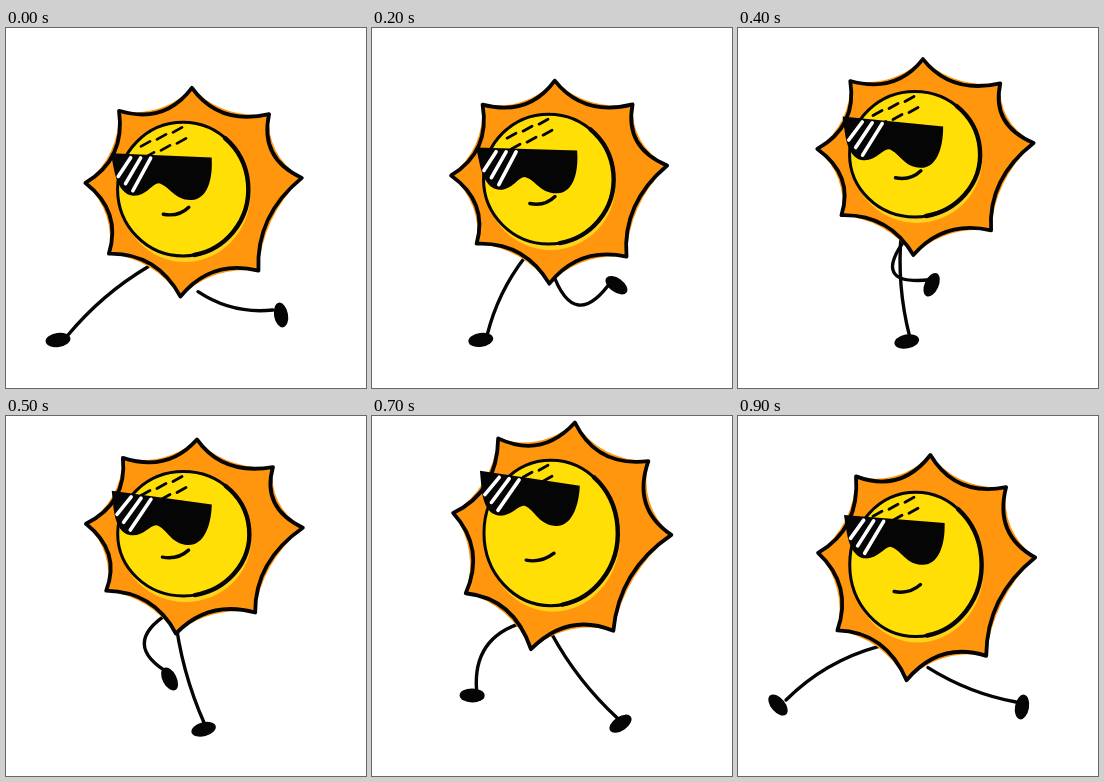
Animation, 360 px wide and 360 px high, one loop 1000 ms. Source, as an HTML page with a canvas:

```html
<!DOCTYPE html>
<html lang="en">
<head>
<meta charset="utf-8">
<title>Strolling sun</title>
<style>
html, body { margin: 0; width: 100%; height: 100%; overflow: hidden; background: #fff; }
canvas { display: block; width: 100vw; height: 100vh; }
</style>
</head>
<body>
<canvas id="stage" width="360" height="360"></canvas>
<script>
const ctx = document.getElementById('stage').getContext('2d');
const INK = '#050505', ORANGE = '#ff960e', YELLOW = '#ffdf06', GLOW = '#ffd21c';
const STEP = 100, STEPS = 10;

// Ray tips around the centre, clockwise from the top
const TIPS = [[-1, -100], [77, -77], [112, -17], [72, 73], [-5, 100], [-78, 61], [-104, -6], [-73, -76]];

const mix = (a, b, f) => a + (b - a) * f;
const rad = deg => deg * Math.PI / 180;

function bezier(t, a, b, c, d) {
  const u = 1 - t;
  return u * u * u * a + 3 * u * u * t * b + 3 * u * t * t * c + t * t * t * d;
}

// Periodic motion: mean plus the first and second harmonic
function wave(step, mean, cos1, sin1, cos2 = 0, sin2 = 0) {
  const a = step / STEPS * Math.PI * 2;
  return mean + cos1 * Math.cos(a) + sin1 * Math.sin(a) + cos2 * Math.cos(2 * a) + sin2 * Math.sin(2 * a);
}

function stroke(width, color = INK) {
  ctx.lineWidth = width;
  ctx.strokeStyle = color;
  ctx.stroke();
}

function fill(color) {
  ctx.fillStyle = color;
  ctx.fill();
}

function line(x1, y1, x2, y2, width, color) {
  ctx.beginPath();
  ctx.moveTo(x1, y1);
  ctx.lineTo(x2, y2);
  stroke(width, color);
}

function oval(x, y, rx, ry, angle = 0, from = 0, to = 360) {
  ctx.beginPath();
  ctx.ellipse(x, y, rx, ry, rad(angle), rad(from), rad(to));
}

// The knee sits off the middle of the line from hip to ankle
function drawLeg({ hip, foot, heel, bend, angle }) {
  const [hx, hy] = hip, [fx, fy] = foot;
  const ax = fx + heel, ay = fy - 5;
  const dx = ax - hx, dy = ay - hy, push = bend / Math.hypot(dx, dy);
  ctx.beginPath();
  ctx.moveTo(hx, hy);
  ctx.quadraticCurveTo((hx + ax) / 2 - dy * push, (hy + ay) / 2 + dx * push, ax, ay);
  stroke(3.4);
  oval(fx, fy, 12.5, 7, angle);
  fill(INK);
}

const plantedLeg = (t, bottom) => ({
  hip: [mix(142, 190, t), bottom - mix(30, 13, t)],
  foot: [bezier(t, 52, 131, 246, 284), bezier(t, 312, 308, 327, 291)],
  heel: mix(10, -6, t),
  bend: 9,
  angle: -8 - 72 * t ** 4
});

const swingingLeg = (t, bottom) => ({
  hip: [mix(192, 140, t), bottom - mix(5, 34, t)],
  foot: [bezier(t, 275, 249, 123, 40), bezier(t, 287, 213, 287, 289)],
  heel: mix(-8, 8, t),
  bend: 14 + 46 * Math.sin(Math.PI * t ** .6),
  angle: bezier(t, 80, 90, -320, -130)
});

function rayPath(tips, cx, cy, hollow) {
  ctx.beginPath();
  ctx.moveTo(...tips[0]);
  tips.forEach(([x, y], i) => {
    const [nx, ny] = tips[(i + 1) % tips.length];
    ctx.quadraticCurveTo(mix((x + nx) / 2, cx, hollow), mix((y + ny) / 2, cy, hollow), nx, ny);
  });
  ctx.closePath();
}

// The paint reaches a little past the ink line
function drawRays(lean, cy, height) {
  const cx = 183 + lean, stretch = height / 200;
  const tips = TIPS.map(([x, y]) => [cx + x - .21 * lean * y, cy + y * stretch + .167 * lean * x]);
  rayPath(tips, cx, cy, .2);
  fill(ORANGE);
  rayPath(tips, cx, cy, .27);
  stroke(3.8);
}

function drawFace(lean, top, height) {
  const x = 176.5 + 2.5 * lean, y = top + height * .485;
  const rx = 65 + 2 * lean, ry = height * .32;
  oval(x + 2, y + 5, rx, ry + 1);
  fill(GLOW);
  oval(x, y, rx, ry);
  fill(YELLOW);
  stroke(3);
  oval(x, y, rx, ry, 0, -50, 80);
  stroke(4.4);
  for (let i = 0; i < 6; i++) {
    const col = i % 3, row = Math.floor(i / 3);
    const hx = 135 + 16 * col + 4 * row, hy = y - ry + 24 - 7 * col + 11 * row;
    line(hx, hy, hx + 9, hy - 5, 2.8);
  }
  const sx = 158 - 4 * lean, sy = top + height * .605;
  ctx.beginPath();
  ctx.moveTo(sx, sy);
  ctx.quadraticCurveTo(sx + 15, sy + 3, sx + 25 + 3 * lean, sy - 7);
  stroke(3.4);
}

function drawGlasses(x, y, tilt) {
  ctx.save();
  ctx.translate(x, y);
  ctx.rotate(rad(tilt));
  ctx.beginPath();
  ctx.moveTo(0, -1);
  ctx.lineTo(101, 1);
  ctx.bezierCurveTo(103, 24, 97, 43, 82, 44);
  ctx.bezierCurveTo(65, 45, 60, 31, 49, 28);
  ctx.bezierCurveTo(42, 28, 37, 41, 24, 41);
  ctx.bezierCurveTo(13, 41, 7, 29, 4, 17);
  ctx.closePath();
  fill(INK);
  for (let i = 0; i < 3; i++) {
    line(20 + i * 10, 3, 8 + i * 7.5, 22 + i * 7, 3.6, '#fff');
  }
  ctx.restore();
}

function draw(step) {
  const cy = wave(step, 139.6, 21.8, 10.7, 2.9);
  const height = wave(step, 210.2, 7.2, -15.1, -8.6, -3.4);
  const lean = wave(step, .385, -.114, -.446, -.093, .056);
  const tilt = wave(step, 4, -2.7, -2.8);
  const brow = wave(step, 24.3, 5.9, 10.1, 1.7);
  const top = cy - height / 2, bottom = cy + height / 2;
  const t = step / (STEPS - 1);

  ctx.fillStyle = '#fff';
  ctx.fillRect(0, 0, 360, 360);
  drawLeg(swingingLeg(t, bottom));
  drawLeg(plantedLeg(t, bottom));
  drawRays(lean, cy, height);
  drawFace(lean, top, height);
  drawGlasses(104 + 4 * lean, top + height * .165 + brow, tilt);
}

ctx.lineCap = ctx.lineJoin = 'round';
const start = performance.now();

function tick() {
  const elapsed = Math.max(0, performance.now() - start);
  draw(Math.floor(elapsed / STEP) % STEPS);
  requestAnimationFrame(tick);
}
tick();
</script>
</body>
</html>
```
